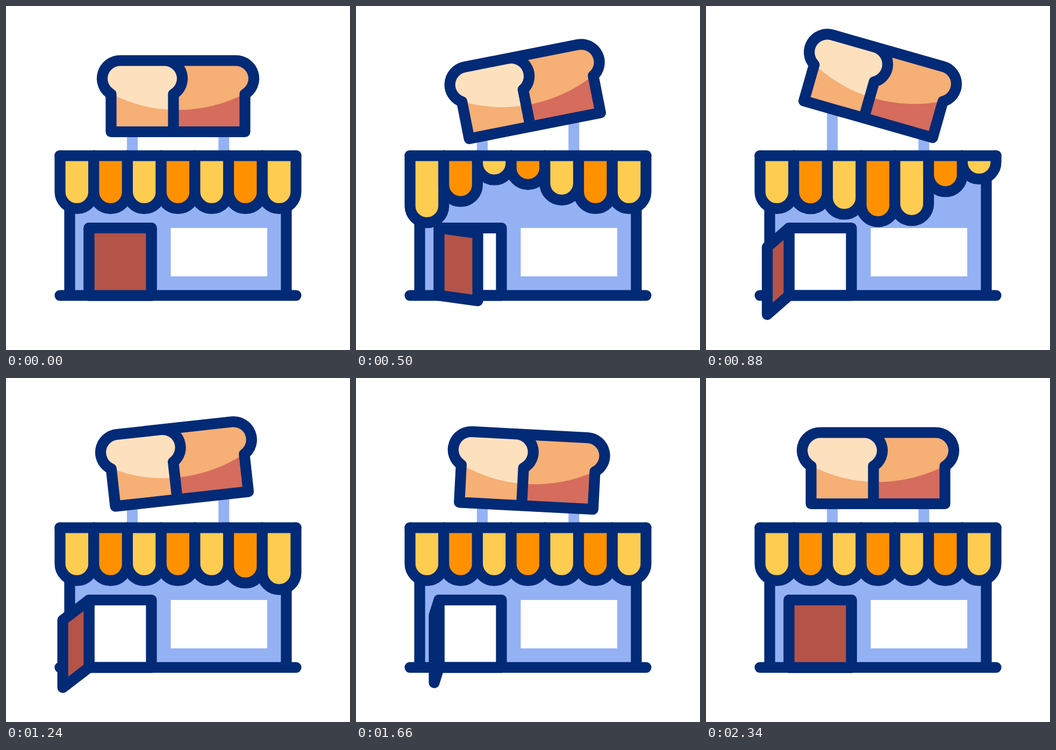
Animation, 640 px wide and 640 px high, one loop 2.4 s. Source, as an HTML page:

```html
<!DOCTYPE html>
<html lang="en">
<head>
<meta charset="utf-8">
<title>Bakery</title>
<style>
html, body { margin: 0; width: 100%; height: 100%; overflow: hidden; background: #fff; }
svg { display: block; width: 100vw; height: 100vh; }
.line { stroke: #032a76; stroke-width: 20.2; stroke-linecap: round; stroke-linejoin: round; }
.none { fill: none; }
</style>
</head>
<body>
<svg viewBox="0 0 640 640">
  <path fill="#94b1f4" d="M225 160h20v118h-20zM395.3 160h20v118h-20zM118.5 278.5h403v260h-403z"/>
  <path fill="#fff" d="M306.5 413H486v90H306.5zM154.5 413h116v125h-116z"/>
  <path class="line none" d="M118.5 290V538.5M521.5 290V538.5M100.5 538.5H539.5"/>
  <g id="awning"></g>
  <path class="line none" d="M100.5 278.5H539.5"/>
  <path class="line none" d="M154.5 413H270.5V538.5H154.5Z"/>
  <path id="door" class="line" fill="#b45348"/>
  <g id="bread">
    <path id="back" fill="#f6af75" d="M195.5 234V163.9A33.5 33.5 0 0 1 212.5 101.5H427.5A33.5 33.5 0 0 1 444.5 163.9V234Z"/>
    <path fill="#d56c5d" d="M195.5 163.3A272 272 0 0 0 444.5 163.3V234H195.5Z"/>
    <path fill="#fde0be" d="M195.5 234V163.9A33.5 33.5 0 0 1 212.5 101.5H294.5A33.5 33.5 0 0 1 311.5 163.9V234Z"/>
    <path fill="#f6af75" d="M195.5 163.3A272 272 0 0 0 311.5 193.4V234H195.5Z"/>
    <path class="line none" d="M195.5 234V163.9A33.5 33.5 0 0 1 212.5 101.5H427.5A33.5 33.5 0 0 1 444.5 163.9V234ZM294.5 101.5A33.5 33.5 0 0 1 311.5 163.9V234"/>
  </g>
</svg>
<script>
const LOOP = 2400;
const byId = id => document.getElementById(id);
const awning = byId('awning'), door = byId('door'), bread = byId('bread');

// Keys are [time, value] pairs joined by sine easing.
const lift = [[0, 0], [310, 24], [745, -60], [985, 5], [1125, -46], [1305, 6],
  [1480, -14], [1670, 4], [1820, -5], [1980, 0]];
const tilt = [[0, 0], [360, -15.4], [960, 17.3], [1330, -10], [1780, 5.5], [2140, 0]];
const wave = [[0, 0], [280, -55], [520, 27.5], [800, 0]];
const delays = [0, 100, 200, 300, 400, 515, 600];

const STEP = 439 / 7, R = STEP / 2;
const flaps = delays.map((delay, i) => {
  const el = document.createElementNS('http://www.w3.org/2000/svg', 'path');
  el.setAttribute('class', 'line');
  el.setAttribute('fill', i % 2 ? '#ff9100' : '#fdcc50');
  awning.append(el);
  return { el, delay, x: 100.5 + i * STEP };
});

function at(keys, t) {
  if (t <= keys[0][0]) return keys[0][1];
  for (let i = 1; i < keys.length; i++) {
    const [t0, v0] = keys[i - 1], [t1, v1] = keys[i];
    if (t < t1) return v0 + (v1 - v0) * (1 - Math.cos(Math.PI * (t - t0) / (t1 - t0))) / 2;
  }
  return keys[keys.length - 1][1];
}

// Cubic bezier easing (.76, 0, .18, 1), solved by bisection.
function ease(x) {
  if (x <= 0) return 0;
  if (x >= 1) return 1;
  let lo = 0, hi = 1;
  for (let i = 0; i < 24; i++) {
    const s = (lo + hi) / 2, r = 1 - s;
    if (3 * r * r * s * 0.76 + 3 * r * s * s * 0.18 + s * s * s < x) lo = s; else hi = s;
  }
  return lo * lo * (3 - 2 * lo);
}

function draw(t) {
  for (const { el, delay, x } of flaps) {
    const y = 345.6 + at(wave, t - delay);
    el.setAttribute('d', `M${x} 278.5V${y}A${R} ${R} 0 0 0 ${x + STEP} ${y}V278.5`);
  }
  const open = 165 * (ease(t / 1200) - ease((t - 1200) / 1130));
  const x = 270.5 - open, drop = open * 0.227;
  door.setAttribute('d', `M154.5 413L${x} ${413 + drop}V${538.5 + drop}L154.5 538.5Z`);
  bread.setAttribute('transform', `translate(0 ${at(lift, t)}) rotate(${at(tilt, t)} 320 167.8)`);
}

function frame() {
  draw(performance.now() % LOOP);
  requestAnimationFrame(frame);
}
frame();
</script>
</body>
</html>
```
